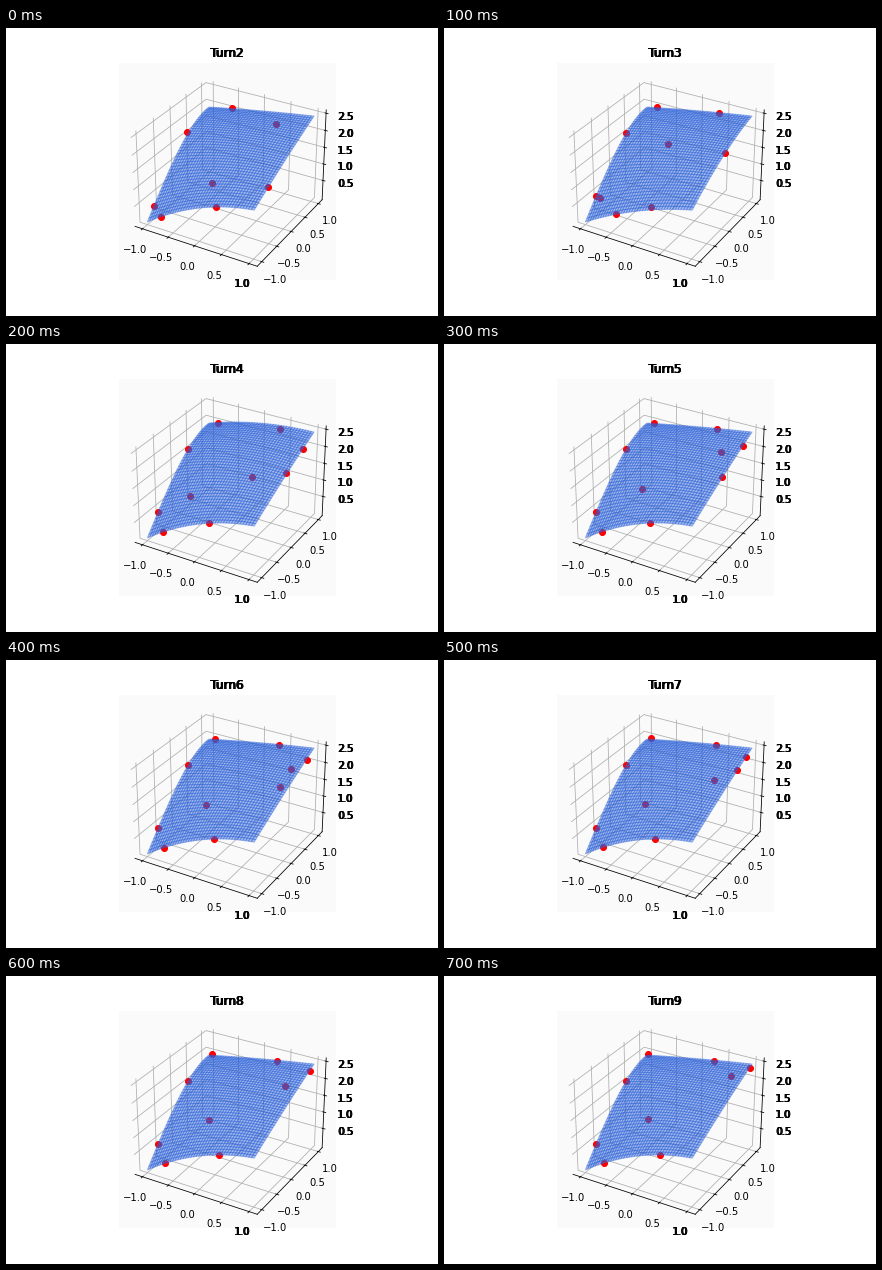
Animation of 432 by 288 pixels, one loop 0.8 s. Source, as a matplotlib script:

```python
import numpy as np
import matplotlib.pyplot as plt
from matplotlib.animation import FuncAnimation
from matplotlib.lines import Line2D
from matplotlib.transforms import Affine2D

W, H, DPI = 432, 288, 72
FIRST_TURN, TURN_COUNT = 2, 8
MESH_BLUE = (0.17, 0.38, 0.85, 0.4)

fig = plt.figure(figsize=(W / DPI, H / DPI), dpi=DPI, facecolor="white")
fig.subplots_adjust(left=0.125, right=0.9, bottom=0.125, top=0.88)
ax = fig.add_subplot(projection="3d")
ax.set_facecolor("#fafafa")
ax.set(xlim=(-1.146, 1.146), ylim=(-1.146, 1.146), zlim=(-0.096, 2.595))

ticks = np.linspace(-1, 1, 5)
names = [f"{t:.1f}".replace("-", "\u2212") for t in ticks]
ax.set_xticks(ticks, names[:-1] + [""])
ax.set_yticks(ticks, names)
ax.set_zticks(np.arange(0.5, 2.6, 0.5), [""] * 5)
for axis in (ax.xaxis, ax.yaxis, ax.zaxis):
    axis.set_pane_color((0.98, 0.98, 0.98, 1))


def heavy_text(x, y, text, size=10, va="center"):
    """Text at stage pixels, overprinted with a slight smear."""
    return [fig.text((x + dx) / W, 1 - y / H, text, size=size, ha="center", va=va)
            for dx in (-0.5, 0.5, -0.5, 0.5)]


title = heavy_text(221.4, 28.6, "", 12, "baseline")
heavy_text(236, 256.4, "1.0")
for k in range(5):
    heavy_text(339.4, 156.2 - 16.8 * k, f"{0.5 + 0.5 * k:.1f}")

# Stage pixels, y downwards; the low zorder keeps the dots under the surface.
pixels = Affine2D().scale(1 / DPI, -1 / DPI).translate(0, H / DPI) + fig.dpi_scale_trans
dots = Line2D([], [], ls="", marker="o", ms=6, mew=1, color="red",
              zorder=0, transform=pixels)
ax.add_artist(dots)

# Key poses (turn, x, y) of each sample; it shows from its first to its last.
PATHS = {
    "left high": [(2, 181, 104), (3, 182, 105), (9, 182, 105)],
    "left low": [(2, 148, 178), (3, 151.5, 168), (9, 151.5, 168)],
    "front near": [(2, 155, 189), (3, 172, 186), (4, 157, 188), (9, 160, 187)],
    "front middle": [(2, 210, 179), (4, 203, 179), (9, 216, 179)],
    "centre": [(2, 206, 155), (3, 156, 170), (4, 184, 152), (5, 198, 145), (9, 204, 143)],
    "back left": [(2, 226, 80), (3, 213, 79), (9, 204, 78)],
    "back right": [(2, 270, 96), (3, 275, 85), (9, 270, 85)],
    "right middle": [(2, 262, 159), (3, 281, 125), (5, 278, 133), (7, 270, 120), (9, 287, 100)],
    "right top": [(4, 297, 105), (9, 306, 92)],
    "inner": [(3, 224, 116), (4, 246, 133), (5, 277, 108), (7, 293, 110)],
}

X, Y = np.meshgrid(np.linspace(-1, 1, 41), np.linspace(-1, 1, 41))


def sample_points(turn):
    for path in PATHS.values():
        turns, xs, ys = zip(*path)
        if turns[0] <= turn <= turns[-1]:
            yield np.interp(turn, turns, xs), np.interp(turn, turns, ys)


def bump(turn, peak):
    return max(0, 1 - abs(turn - peak))


def height(x, y, turn):
    west, east, south, north = (1 - x) / 2, (1 + x) / 2, (1 - y) / 2, (1 + y) / 2
    front = 0.238 - 0.09 * bump(turn, 3)
    back = 0.02 + 0.107 * bump(turn, 4)
    right = 0.035 + 0.115 * bump(turn, 3)
    corners = (south * (-0.014 * west + 1.323 * east)
               + north * (1.921 * west + 2.461 * east))
    along_x = (1 - x**2) * (front * south + back * north)
    along_y = (1 - y**2) * ((0.38 + 0.124 * y) * west + right * east)
    return corners + along_x + along_y


def draw(i):
    turn = FIRST_TURN + i
    for old in list(ax.collections):
        old.remove()
    ax.plot_surface(X, Y, height(X, Y, turn), rstride=1, cstride=1, shade=False,
                    color=MESH_BLUE, edgecolor=MESH_BLUE, linewidth=1)
    dots.set_data(*zip(*sample_points(turn)))
    for layer in title:
        layer.set_text(f"Turn{turn}")
    return [dots, *title]


anim = FuncAnimation(fig, draw, frames=TURN_COUNT, interval=100,
                     repeat=True, repeat_delay=0, blit=False)
plt.show()
```
